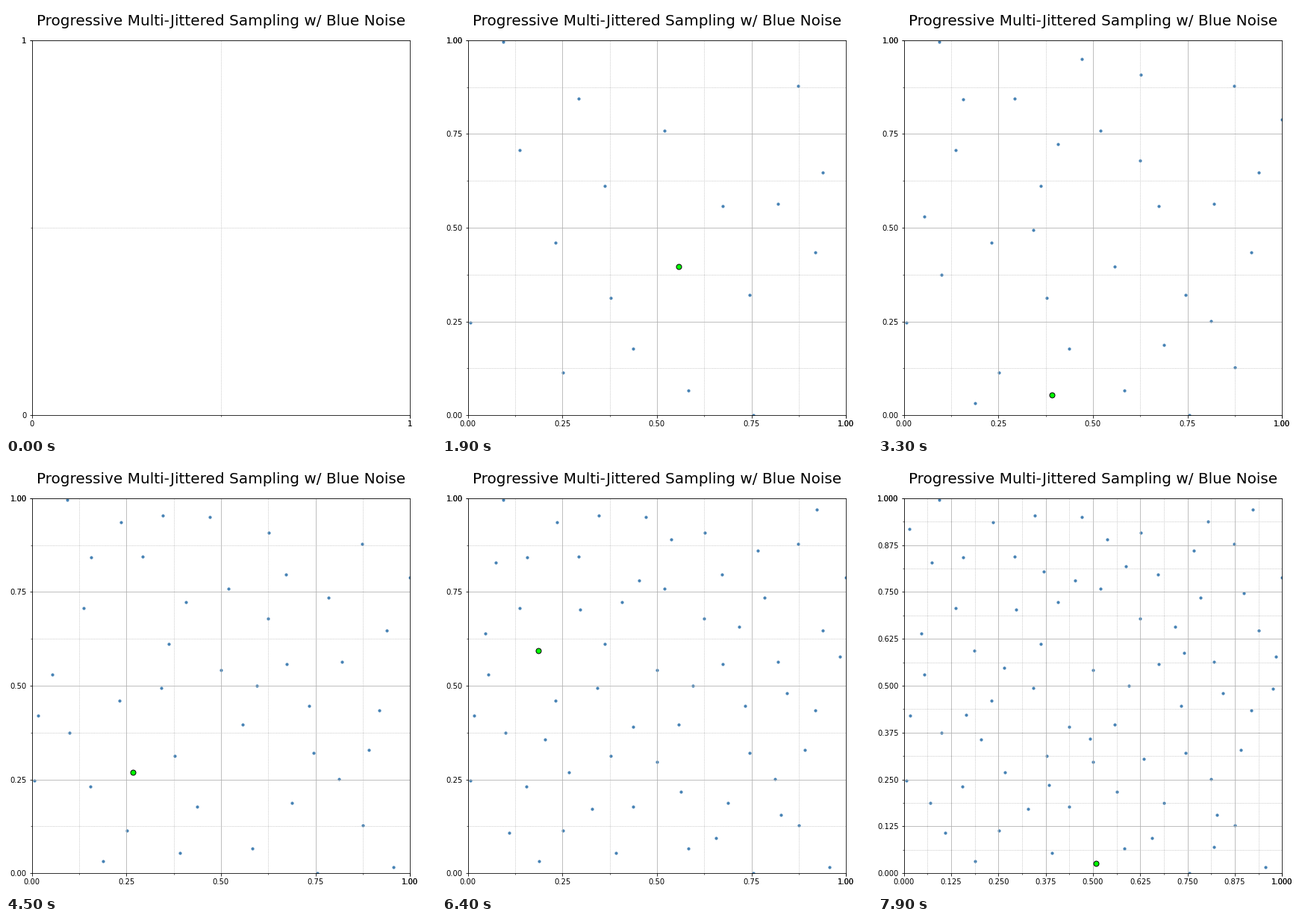
A matplotlib script for the animation above (8 s loop, 576 by 576 pixels).

```python
import matplotlib.pyplot as plt
import numpy as np
from matplotlib.animation import FuncAnimation

SIZE, DPI = 576, 72
LEFT, RIGHT, TOP, BOTTOM = 34.56, 541.2, 45.8, 548.3
FRAMES, INTERVAL = 80, 100

# Starting samples; every later one is placed by the sampling rule.
START = [
    (.4378, .1777), (.938, .6464), (.7444, .321), (.093, .9962),
    (.2314, .4599), (.5206, .7594), (.7548, .0008), (.3615, .612),
    (.0062, .2468), (.6749, .5586), (.9179, .4344), (.2924, .845),
    (.3773, .3122), (.8739, .8776), (.5831, .0661), (.1367, .7077),
]
# Starting samples whose third sub-cell lies above or below, not beside.
UPRIGHT = {0, 2, 10, 11, 13, 14}
STEPS = (np.arange(16) + 0.5) / 16


def free_coords(taken, cell, cells, strata):
    """Coordinates along one axis of a cell, in strata not used so far."""
    per_cell = strata // cells
    used = set((taken * strata).astype(int))
    slots = [s for s in range(cell * per_cell, (cell + 1) * per_cell)
             if s not in used]
    return np.concatenate([(s + STEPS) / strata for s in slots])


def farthest(points, cell, cells, strata):
    """Spot in a cell farthest from all points, wrapping at the borders."""
    axes = [free_coords(points[:, k], cell[k], cells, strata) for k in (0, 1)]
    spots = np.stack(np.meshgrid(*axes), axis=-1).reshape(-1, 2)
    gap = np.abs(spots[:, None] - points)
    gap = np.minimum(gap, 1 - gap)
    return spots[(gap ** 2).sum(axis=-1).min(axis=1).argmax()]


def extend(points, cells, strata, flip):
    """Add one sample per starting sample, in the sub-cell flip points to."""
    for i, start in enumerate(START):
        cell = (np.array(start) * cells).astype(int) ^ flip(i)
        points = np.vstack([points, farthest(points, cell, cells, strata)])
    return points


def diagonal(i):
    return np.array([1, 1])


def beside(i):
    return np.array([0, 1] if i in UPRIGHT else [1, 0])


samples = np.array(START)
samples = extend(samples, 8, 32, diagonal)
samples = extend(samples, 8, 64, beside)
samples = extend(samples, 8, 64, lambda i: 1 - beside(i))
samples = extend(samples, 16, 128, diagonal)

fig = plt.figure(figsize=(SIZE / DPI, SIZE / DPI), dpi=DPI)
ax = fig.add_axes([LEFT / SIZE, 1 - BOTTOM / SIZE,
                   (RIGHT - LEFT) / SIZE, (BOTTOM - TOP) / SIZE])
ax.set_title("Progressive Multi-Jittered Sampling w/ Blue Noise",
             fontsize=20, pad=20)
ax.set(xlim=(0, 1), ylim=(0, 1))
ax.grid(which="major")
ax.grid(which="minor", linestyle=":")

dots = ax.scatter([], [], s=10, color="steelblue")
newest = ax.scatter([], [], s=49, color="lime", edgecolor="black",
                    linewidth=1, zorder=2)


def set_grid(level):
    cells = 2 ** level
    # The end tick is doubled, which darkens its label.
    major = [*np.arange(cells + 1) / cells, 1.0]
    labels = [f"{t:.{level}f}" for t in major]
    minor = (np.arange(cells) + 0.5) / cells
    for axis in (ax.xaxis, ax.yaxis):
        axis.set_ticks(major, labels)
        axis.set_ticks(minor, minor=True)


def update(n):
    # Cells halve each time the sample count passes a power of four.
    set_grid((max(n - 1, 1).bit_length() - 1) // 2)
    last = max(n - 1, 0)
    dots.set_offsets(samples[:last])
    newest.set_offsets(samples[last:n])
    return dots, newest


anim = FuncAnimation(fig, update, frames=FRAMES, interval=INTERVAL,
                     init_func=lambda: update(0), repeat=True, repeat_delay=0)
plt.show()
```
